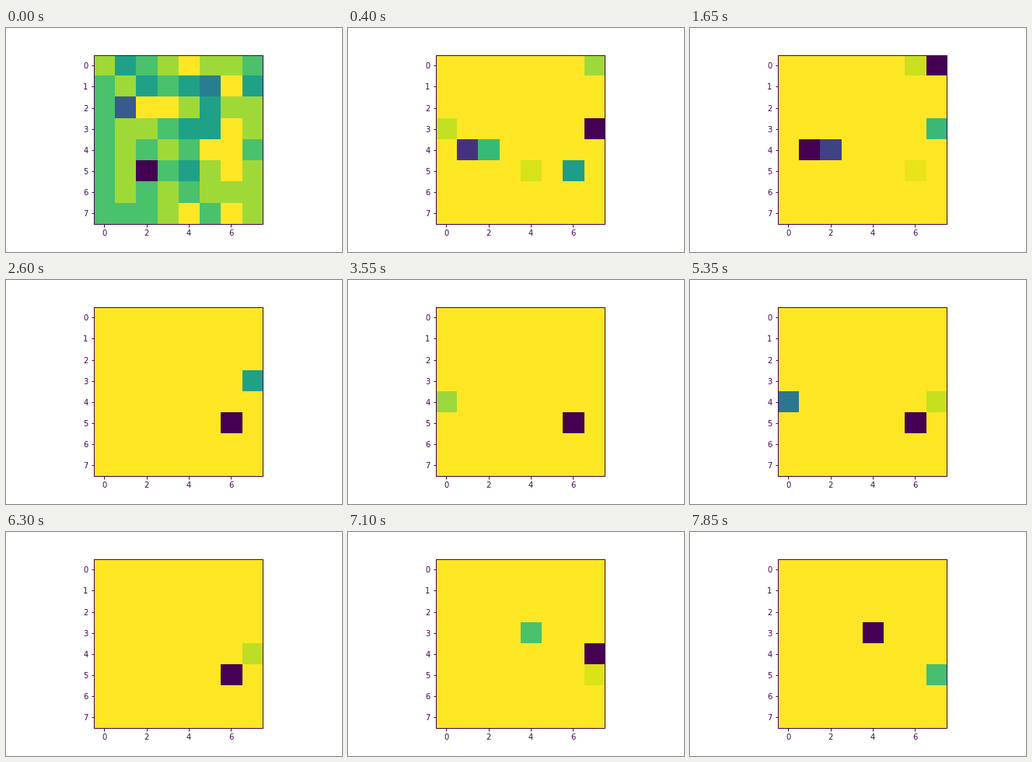
A matplotlib script that plays this animation: 432 px wide and 288 px high, repeating every 7900 ms.

```python
import numpy as np
import matplotlib.pyplot as plt
from matplotlib.animation import FuncAnimation

FRAMES, STEP_MS = 158, 50
SIZE, TOTAL = 8, 100
INK = "#440154"

# Piles (row, column): size at a few moments; they drift in between.
POSES = {
    8: {(3, 7): 34, (4, 1): 29, (5, 6): 15, (4, 2): 11, (0, 7): 5,
        (3, 0): 3, (5, 4): 2},
    33: {(0, 7): 31, (4, 1): 31, (4, 2): 25, (3, 7): 10, (0, 6): 2.5,
         (5, 6): 1},
    42: {(3, 7): 100},
    45: {(3, 7): 100},
    52: {(5, 6): 70, (3, 7): 30},
    59: {(5, 6): 100},
    65: {(5, 6): 100},
    87: {(5, 6): 55, (4, 0): 45},
    126: {(5, 6): 91, (4, 7): 9},
    137: {(4, 7): 100},
    139: {(4, 7): 100},
    157: {(3, 4): 77, (5, 7): 23},
}
TIMES = list(POSES)
SETTLE = TIMES[0]


def scatter(rng):
    """A crowd spread thinly over the grid, with three early clumps."""
    crowd = rng.choice(4, size=(SIZE, SIZE), p=[0.17, 0.41, 0.27, 0.15])
    crowd[5, 2], crowd[2, 1], crowd[1, 5] = 7, 5, 4
    return crowd


def jitter(rng, step=0.12):
    """Random walk per cell, pulled back to zero at every pose."""
    walk = rng.normal(0, step, (FRAMES, SIZE, SIZE)).cumsum(axis=0)
    return walk - between_poses(walk[TIMES])


def between_poses(grids):
    """Blend one grid per pose linearly over all frames."""
    frames = np.arange(FRAMES)
    flat = np.reshape(grids, (len(TIMES), -1))
    tracks = [np.interp(frames, TIMES, sizes) for sizes in flat.T]
    return np.transpose(tracks).reshape(FRAMES, SIZE, SIZE)


def build_history():
    rng = np.random.default_rng(7)
    poses = np.zeros((len(TIMES), SIZE, SIZE))
    for grid, piles in zip(poses, POSES.values()):
        for cell, size in piles.items():
            grid[cell] = size
    history = between_poses(poses) * np.exp(jitter(rng))
    history *= TOTAL / history.sum(axis=(1, 2), keepdims=True)

    # The scattered start thins out by repeated resampling.
    crowd = scatter(rng)
    for k in range(SETTLE):
        u = k / SETTLE
        history[k] = (1 - u) * crowd + u * poses[0]
        share = crowd.ravel() / crowd.sum()
        crowd = rng.multinomial(TOTAL, share).reshape(SIZE, SIZE)
    return history


history = build_history()

plt.rcParams.update({
    "font.family": "DejaVu Sans", "font.size": 10,
    "axes.edgecolor": INK, "xtick.color": INK, "ytick.color": INK,
    "axes.linewidth": 1, "xtick.major.width": 1, "ytick.major.width": 1,
})
fig, ax = plt.subplots(figsize=(6, 4), dpi=72, facecolor="white")
fig.subplots_adjust(left=0.125, right=0.9, bottom=0.125, top=0.88)
image = ax.imshow(-history[0], cmap="viridis", interpolation="nearest")
ax.set_xticks(range(0, SIZE, 2))
ax.set_yticks(range(SIZE))


def draw(k):
    grid = -history[k]
    image.set_data(grid)
    image.set_clim(grid.min(), 0)
    return [image]


anim = FuncAnimation(fig, draw, frames=FRAMES, init_func=lambda: draw(0),
                     interval=STEP_MS, repeat=True, repeat_delay=0)
plt.show()
```
